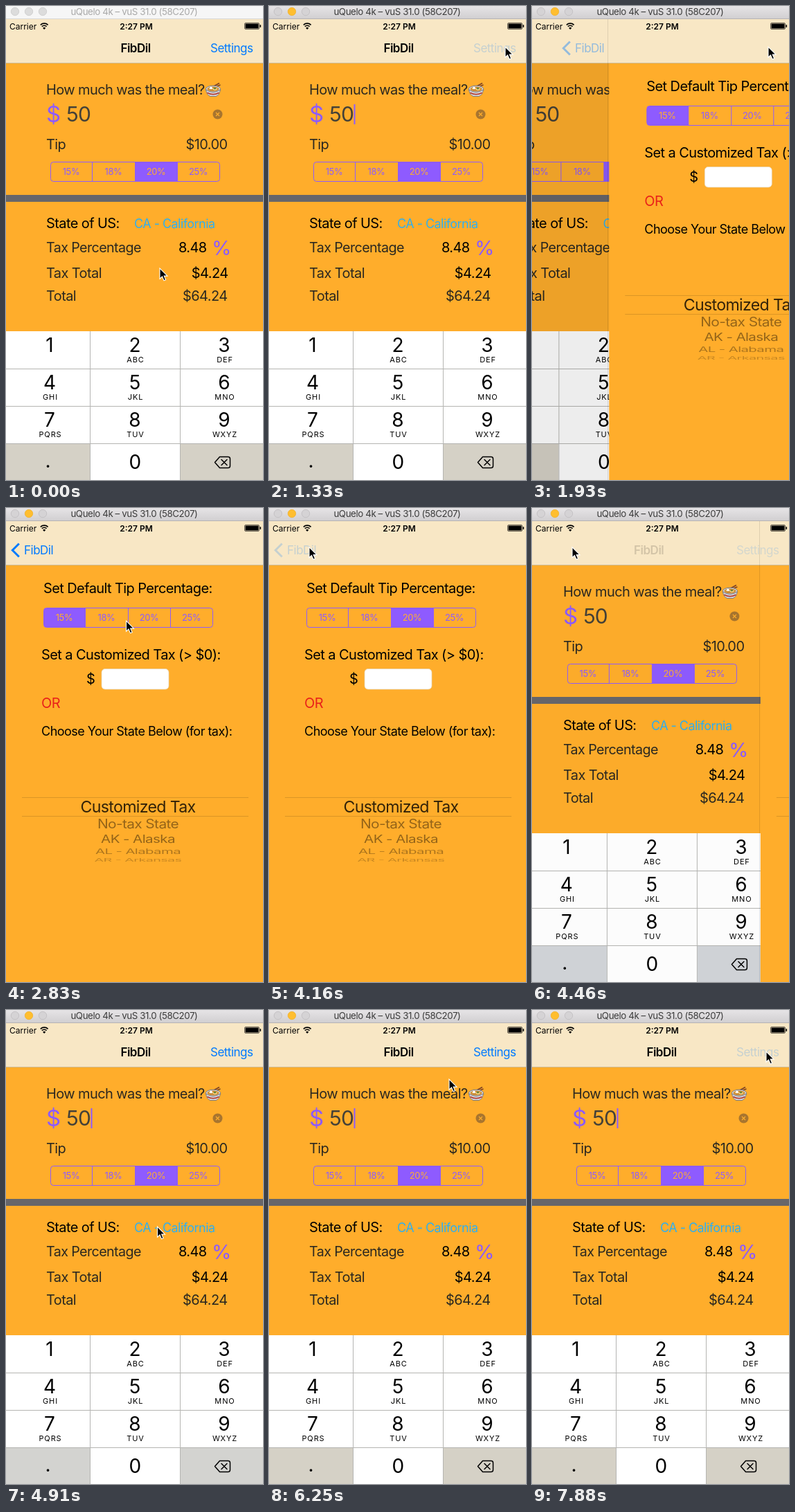
Recreate the animation shown at these times as an HTML page. Size 371 by 685 pixels, loop 8000 ms.

```html
<!DOCTYPE html>
<html lang="en">
<head>
<meta charset="utf-8">
<title>Tip calculator</title>
<style>
html, body { margin: 0; width: 100%; height: 100%; overflow: hidden; background: #ffad2b; }
svg { display: block; width: 371px; height: 685px; }
text { font-family: Inter, Roboto, "Liberation Sans", sans-serif; letter-spacing: -.03em; white-space: pre; }
.plain { letter-spacing: 0; }
.keys { letter-spacing: .08em; }
</style>
</head>
<body>
<svg id="stage" viewBox="0 0 371 685"></svg>
<script>
const LOOP = 8000, TICK = 148.82;
const ORANGE = '#ffad2b', PURPLE = '#8e5bff', BLUE = '#007aff', NAV = '#f8e7c5', INK = '#2b2820';
const APP = 'FibDil';

const text = (x, y, s, size, fill = '#000', anchor = 'start', extra = '') =>
  `<text x="${x}" y="${y}" font-size="${size}" fill="${fill}" text-anchor="${anchor}" ${extra}>${s}</text>`;
const rect = (x, y, w, h, fill, extra = '') =>
  `<rect x="${x}" y="${y}" width="${w}" height="${h}" fill="${fill}" ${extra}/>`;
const path = (d, stroke, width, extra = '') =>
  `<path d="${d}" fill="none" stroke="${stroke}" stroke-width="${width}" ${extra}/>`;

// Four tip choices in one rounded control
function segments(x, y, chosen) {
  const edges = [0, 60, 122, 183, 244], clip = `clip${y}-${chosen}`;
  let s = `<clipPath id="${clip}">${rect(x, y, 244, 28, '#000', 'rx="4"')}</clipPath>`;
  s += rect(x + edges[chosen], y, edges[chosen + 1] - edges[chosen], 28, PURPLE, `clip-path="url(#${clip})"`);
  s += rect(x, y, 244, 28, 'none', `rx="4" stroke="${PURPLE}"`);
  for (let i = 1; i < 4; i++) s += path(`M${x + edges[i]} ${y}v28`, PURPLE, 1);
  ['15%', '18%', '20%', '25%'].forEach((label, i) => {
    const mid = x + (edges[i] + edges[i + 1]) / 2 - .5;
    s += text(mid, y + 18.7, label, 13, i === chosen ? ORANGE : PURPLE, 'middle');
  });
  return s;
}

function bowl() {
  return `<g transform="translate(299 121)">
    ${path('M-1 -4L9 -9.5M1 -3L10.5 -7', '#7a3f26', 1.5)}
    <ellipse cy="-1" rx="10.5" ry="4.8" fill="#e4e4e6" stroke="#777b86" stroke-width="1"/>
    <ellipse cy="-1" rx="8.6" ry="3.4" fill="#c98a35"/>
    ${path('M-6 -1q3 -3 6 0t6 -1', '#f6dc8c', 1.3)}
    <circle cx="-3" cy="-2.4" r="1.8" fill="#fff"/><circle cx="2.5" cy="-2" r="1.3" fill="#4f8a3c"/>
    <path d="M-10.5 0Q-9 8 -4 9.5H4Q9 8 10.5 0Q0 7 -10.5 0Z" fill="#d9dbe0" stroke="#6f737e" stroke-width=".9"/>
    ${path('M-8.6 4.2Q0 9 8.6 4.2', '#b23a32', 1.6)}
  </g>`;
}

function keyboard() {
  const cols = [63, 186, 315], tops = [470, 524, 578, 632];
  const letters = ['', 'ABC', 'DEF', 'GHI', 'JKL', 'MNO', 'PQRS', 'TUV', 'WXYZ'];
  let s = rect(0, 470, 371, 215, '#fff');
  s += rect(0, 632, 121, 53, '#d5d1c6', 'class="side"') + rect(252, 632, 119, 53, '#d5d1c6', 'class="side"');
  s += path('M0 524.5H371M0 578.5H371M0 632.5H371M121.5 470V685M251.5 470V685', '#b5b5b2', 1);
  letters.forEach((l, i) => {
    const x = cols[i % 3], y = tops[Math.floor(i / 3)];
    s += text(x, y + 30, i + 1, 28, '#000', 'middle', 'class="plain"');
    s += text(x + 1, y + 45, l, 11, '#000', 'middle', 'class="keys"');
  });
  s += text(60, 667, '.', 28, '#000', 'middle') + text(186, 669, '0', 28, '#000', 'middle');
  s += path('M308.5 651.5H320.5Q323.5 651.5 323.5 654.5V664.5Q323.5 667.5 320.5 667.5H308.5L301.5 659.5ZM311 655.5l8 8m0 -8l-8 8',
    '#000', 1.5, 'stroke-linejoin="round" stroke-linecap="round"');
  return s;
}

function mainPage() {
  return rect(0, 83, 371, 602, ORANGE)
    + text(58, 128, 'How much was the meal?', 20, INK) + bowl()
    + text(58, 168, '$', 33, PURPLE) + text(87, 167, '50', 30, '#444138')
    + rect(122.5, 142, 2, 29, PURPLE, 'id="caret"')
    + '<circle cx="305.5" cy="156.5" r="7" fill="#a8752f"/>'
    + path('M303 154l5 5m0 -5l-5 5', ORANGE, 1.2)
    + text(58, 207, 'Tip', 20, INK) + text(319.5, 207, '$10.00', 20, INK, 'end')
    + segments(64.5, 225.5, 2)
    + rect(0, 273, 371, 10, '#67666a')
    + text(58, 321, 'State of US:', 20) + text(185, 321, 'CA - California', 18, '#2eaff0')
    + text(58, 356, 'Tax Percentage', 19.7, INK) + text(289.5, 356, '8.48', 20, '#000', 'end')
    + text(297, 360, '%', 29, PURPLE)
    + text(58, 393, 'Tax Total', 20, INK) + text(320.5, 393, '$4.24', 20, '#000', 'end')
    + text(58, 426, 'Total', 20, INK) + text(319.5, 426, '$64.24', 20, INK, 'end')
    + keyboard();
}

function settingsPage() {
  const wheel = [
    ['Customized Tax', 440, 23.2, 1, .8], ['No-tax State', 463, 20.9, .88, .42],
    ['AK - Alaska', 484, 20.6, .76, .42], ['AL - Alabama', 500, 20.4, .52, .32],
    ['AR - Arkansas', 511, 19.8, .34, .22]
  ];
  return rect(0, 83, 371, 602, ORANGE)
    + text(54, 123, 'Set Default Tip Percentage:', 20)
    + `<g id="first">${segments(54.5, 144.5, 0)}</g><g id="third">${segments(54.5, 144.5, 2)}</g>`
    + text(51, 219, 'Set a Customized Tax (&gt; $0):', 20)
    + text(116, 254, '$', 20)
    + rect(138, 232.5, 97, 29.5, '#fff', 'rx="5" stroke="#e3d3b4" stroke-width=".7"')
    + text(51, 289, 'OR', 20, '#e9221a')
    + text(51, 329, 'Choose Your State Below (for tax):', 18.05)
    + path('M23 418.5H350M23 445.5H350', '#000', 1, 'opacity=".14"')
    + wheel.map(([s, y, size, squash, alpha]) =>
      text(0, 0, s, size, '#000', 'middle', `opacity="${alpha}" transform="translate(190.5 ${y}) scale(1 ${squash})"`)).join('');
}

function statusBar() {
  return text(5, 33.5, 'Carrier', 12, '#000', 'start', 'class="plain"')
    + path('M49.8 27.4a7.6 7.6 0 0 1 10.8 0M51.8 29.6a4.8 4.8 0 0 1 6.8 0', '#000', 1.6)
    + '<path d="M55.2 34l-2.1 -2.3a3 3 0 0 1 4.2 0Z"/>'
    + text(188, 33.5, '2:27 PM', 12, '#000', 'middle', 'class="plain" font-weight="600"')
    + rect(344.5, 24.5, 21, 9, 'none', 'rx="1.5" stroke="#000" stroke-width=".6"')
    + rect(345.5, 25.5, 19, 7, '#000') + rect(366.5, 27, 1.6, 4, '#000', 'rx=".8"');
}

function titleBar(id, fill, dot, ring, middle, middleRing, ink, line) {
  return `<g id="${id}">${rect(0, 0, 371, 19, fill)}${path('M0 18.5H371', line, 1)}`
    + [13, 33, 53].map((x, i) => {
      const [c, edge] = i === 1 ? [middle, middleRing] : [dot, ring];
      return `<circle cx="${x}" cy="8" r="5.7" fill="${c}" stroke="${edge}" stroke-width=".8"/>`;
    }).join('')
    + text(185, 12.8, 'uQuelo 4k – vuS 31.0 (58C207)', 13.3, ink, 'middle') + '</g>';
}

const stage = document.getElementById('stage');
stage.innerHTML = `<defs><linearGradient id="metal" x2="0" y2="1">
    <stop stop-color="#e6e4e6"/><stop offset="1" stop-color="#d0ced0"/></linearGradient></defs>
  <g id="main">${mainPage()}</g>
  ${rect(0, 83, 371, 602, '#000', 'id="shade"')}
  <g id="prefs">${settingsPage()}</g>
  ${rect(0, 19, 371, 64, NAV)}${path('M0 82.5H371', '#cdb991', 1)}
  ${path('M.5 19V685', '#000', 1, 'id="edge" opacity=".1"')}
  ${statusBar()}
  ${text(187, 67, APP, 17, '#000', 'middle', 'id="title" font-weight="600"')}
  ${text(295, 67, 'Settings', 17, BLUE, 'start', 'id="settings"')}
  <g id="back">${path('M18.8 51.5L9.3 61L18.8 70.5', BLUE, 3)}${text(26, 67, APP, 17, BLUE)}</g>
  ${titleBar('idle', '#f6f6f6', '#dcdcdc', '#cbcbcb', '#dcdcdc', '#cbcbcb', '#a9a9a9', '#d8d8d8')}
  ${titleBar('active', 'url(#metal)', '#d5d3d5', '#bfbdbf', '#ffbe2f', '#f0b02c', '#3c3c3c', '#b5b3b5')}
  <path id="cursor" d="M0 0V15.2L3.5 12L6 17.8L8.6 16.7L6.2 11.1H11Z" fill="#000" stroke="#fff" stroke-width="1.1"/>`;

const el = {};
stage.querySelectorAll('[id]').forEach(n => el[n.id] = n);
const sides = stage.querySelectorAll('.side');

// Held values: [step, value]
const shown = [[0, 1], [13, .3], [14, 0], [29, .45], [30, .889], [31, .985], [32, 1]];
const caret = [[0, 0], [1, .5], [2, 1], [5, .5], [6, 0], [8, .5], [9, 1], [13, 0], [32, 1], [36, .5], [37, 0],
  [39, .5], [40, 1], [43, .5], [44, 0], [45, .5], [46, 1], [49, .5], [50, 0], [52, .5], [53, 1]];
const settingsTap = [[0, 1], [8, .5], [9, .2], [14, 1], [52, .5], [53, .2]];
const backTap = [[0, 1], [27, .5], [28, .2]];
const sideTint = [[0, '#d5d1c6'], [29, '#d1d4d9'], [33, '#d3d3d0'], [34, '#d5d1c6']];
// Pointer moves: [from step, to step, x, y]
const moves = [[0, 6, 341, 59], [16, 19, 173.5, 163], [19, 21, 203, 161], [22, 26, 58, 56.5], [30, 32, 205, 299],
  [32, 34, 232, 327], [35, 42, 260, 100], [42, 44, 358, 66], [44, 46, 338, 60]];

const clamp = v => Math.max(0, Math.min(1, v));
const ease = v => v * v * (3 - 2 * v);
const held = (track, step) => track.filter(k => k[0] <= step).pop()[1];

function pointer(step) {
  let x = 222, y = 379;
  for (const [from, to, tx, ty] of moves) {
    const k = ease(clamp((step - from) / (to - from)));
    x += (tx - x) * k;
    y += (ty - y) * k;
  }
  return [x, y];
}

const move = (node, x, y = 0) => node.setAttribute('transform', `translate(${x} ${y})`);
const fade = (node, v) => node.style.opacity = v;
const show = (node, on) => node.style.display = on ? '' : 'none';

function draw(now) {
  const step = Math.floor((now % LOOP + 10) / TICK);
  const p = held(shown, step), nav = clamp((p - .87) / .13);
  move(el.main, -118 * (1 - p));
  move(el.prefs, 371 * p);
  move(el.edge, Math.round(371 * p) - 2);
  move(el.title, -165 * (1 - p));
  move(el.back, 120 * p);
  show(el.prefs, p < 1);
  show(el.edge, p > 0 && p < 1);
  fade(el.shade, .1 * (1 - p));
  fade(el.title, nav);
  fade(el.settings, nav * held(settingsTap, step));
  fade(el.back, clamp(1 - 2 * p) * held(backTap, step));
  fade(el.caret, held(caret, step));
  show(el.first, step < 22);
  show(el.third, step >= 22);
  show(el.active, step >= 8);
  sides.forEach(s => s.setAttribute('fill', held(sideTint, step)));
  move(el.cursor, ...pointer(step));
}

let start;
function frame(now) {
  start ??= now;
  draw(now - start);
  requestAnimationFrame(frame);
}
draw(0);
requestAnimationFrame(frame);
</script>
</body>
</html>
```
